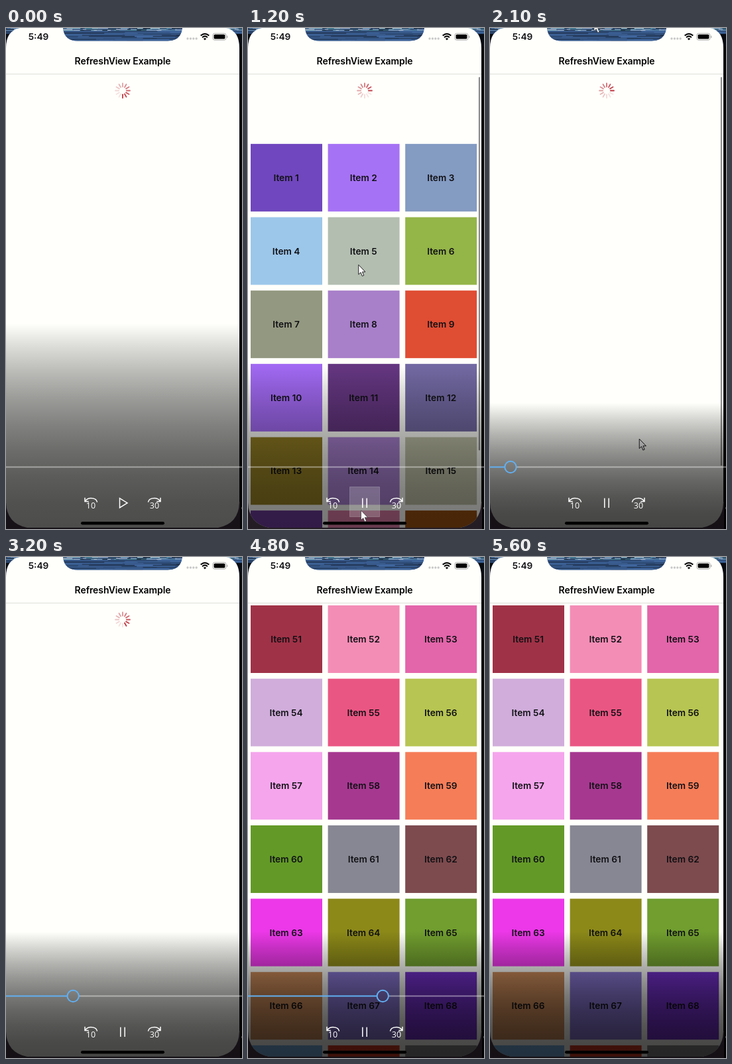
An HTML page for the animation above (5700 ms loop, 356 by 756 pixels).

```html
<!DOCTYPE html>
<html lang="en">
<head>
<meta charset="utf-8">
<title>Pull to refresh</title>
<style>
  html, body { margin: 0; width: 100%; height: 100%; overflow: hidden; background: #000; }
  svg { display: block; width: 356px; height: 756px; }
  text { font-family: Inter, Roboto, sans-serif; text-anchor: middle; }
  .label { font-size: 13.7px; font-weight: 600; fill: #101014; }
  .title { font-size: 14px; font-weight: 600; letter-spacing: -.1px; fill: #000; }
  .skip { font: 12.5px "Open Sans", "Noto Sans", sans-serif; fill: #fff; }
</style>
</head>
<body>
<svg viewBox="0 0 356 756">
  <defs>
    <clipPath id="phone"><path d="M21 0H332Q352 4 352 30V716Q351 748 320 754H32Q1 748 0 716V30Q0 4 21 0Z"/></clipPath>
    <clipPath id="page"><rect y="70" width="353" height="686"/></clipPath>
    <clipPath id="notch"><path d="M86 0Q88 19.5 108 19.5H244Q264 19.5 266 0Z"/></clipPath>
    <linearGradient id="shade" gradientUnits="userSpaceOnUse" x1="0" x2="0" y2="756"/>
    <path id="arrow" d="M0 0V14.5L3.3 11.5L5.6 17L8 16L5.7 10.7H10.2Z" stroke-linejoin="round"/>
  </defs>

  <rect width="356" height="756" fill="#080b12"/>
  <g id="wallpaper"></g>
  <rect y="715" width="353" height="41" fill="#4c3c4c"/>
  <rect x="353" y="28" width="3" height="728" fill="#050505"/>
  <rect x="355" y="723" width="1" height="3" fill="#ddd"/>

  <g clip-path="url(#phone)">
    <rect width="353" height="756" fill="#fffffb"/>
    <g id="spinner" transform="translate(176 94.5)"></g>
    <g clip-path="url(#page)"><g id="first"></g><g id="second"></g></g>
    <rect id="bar" x="347.9" y="74" width="2.2" rx="1.1" fill="#8e8e8e"/>
    <rect y="69" width="353" height="1" fill="#dededb"/>
    <text class="title" x="176" y="55.3">RefreshView Example</text>
    <text class="label" x="49" y="18">5:49</text>
    <path d="M274 16H288" stroke="#c9c9c9" stroke-width="3.4" stroke-linecap="round" stroke-dasharray="0 4.4"/>
    <g fill="none" stroke="#000" stroke-width="2">
      <path d="M293.7 11.6Q300 5.8 306.3 11.6M296.1 14.2Q300 10.6 303.9 14.2"/>
      <path d="M300 18.6L297.8 16.1Q300 14.4 302.2 16.1Z" fill="#000" stroke="none"/>
    </g>
    <rect x="312" y="8.2" width="20" height="10" rx="2.8" fill="none" stroke="#aaa"/>
    <rect x="313.6" y="9.8" width="16.8" height="6.8" rx="1.5"/>
    <rect x="333.2" y="11.5" width="1.2" height="3.5" rx=".6" fill="#aaa"/>
    <rect x="113" y="745" width="126" height="4.6" rx="2.3"/>
  </g>
  <g id="camera" clip-path="url(#notch)"></g>
  <use id="pointer" href="#arrow" fill="#fff" stroke="#222"/>

  <rect width="356" height="756" fill="url(#shade)"/>

  <g id="controls" fill="none" stroke="#fff" stroke-width="1.5">
    <path id="rest" stroke-opacity=".42" stroke-width="2"/>
    <g id="progress" stroke="#62b0f2" stroke-width="2">
      <path id="played"/><circle id="knob" cy="662.5" r="8.7"/>
    </g>
    <rect id="hover" x="153.5" y="692.5" width="45" height="45" fill="#fff" fill-opacity=".2" stroke-opacity=".2" stroke-width="1"/>
    <path id="play" d="M171.5 709.5V724L183 716.7Z"/>
    <path id="pause" d="M172.8 709.5V724M179.2 709.5V724"/>
    <path id="back" d="M137.6 715.5Q136.5 709.6 128 709.6Q122.5 709.6 119.2 714.2M119 708.8V714.6H124.8"/>
    <use href="#back" transform="translate(352 0) scale(-1 1)"/>
    <g stroke="none"><text class="skip" x="128" y="724.8">10</text><text class="skip" x="224" y="724.8">30</text></g>
  </g>
  <use id="mouse" href="#arrow" fill="#fff" stroke="#333" stroke-width=".7"/>
</svg>

<script>
const LOOP = 5700, STEP = 100;
// Playback starts, the list empties, the finger lets go, new items arrive, the spinner row closes.
const START = 400, CLEAR = 1300, RELEASE = 1550, ARRIVE = 3250, CLOSE = 3300;
const REST = 58, BOTTOM = 756;

const $ = id => document.getElementById(id);
const show = (el, on) => { el.style.display = on ? '' : 'none'; };
const mix = (a, b, k) => a + (b - a) * k;

function set(el, attrs) {
  for (const k in attrs) el.setAttribute(k, attrs[k]);
}
function add(parent, tag, attrs, text) {
  const el = document.createElementNS('http://www.w3.org/2000/svg', tag);
  set(el, attrs);
  if (text) el.textContent = text;
  return parent.appendChild(el);
}
// Smooth step from 0 to 1 between times a and b.
function ramp(t, a, b) {
  const k = Math.min(1, Math.max(0, (t - a) / (b - a)));
  return k * k * (3 - 2 * k);
}

function buildTiles(group, first, colours) {
  colours.split(' ').forEach((c, i) => {
    const x = 4 + (i % 3) * 116.6, y = 73 + Math.floor(i / 3) * 110.65;
    add(group, 'rect', { x, y, width: 108, height: 102, fill: '#' + c });
    add(group, 'text', { class: 'label', x: x + 53.6, y: y + 56 }, 'Item ' + (first + i));
  });
}
buildTiles($('first'), 1, '7047be a672f5 849bc2 9cc7ea b3beb0 94b548 939880 a87fc9 df4d33 ' +
  'a169f2 643680 7269a2 947f24 aa82d2 c0c2a8 6c3a98 dc7ba5 9a5010 c09aac e8863a e0a84a');
buildTiles($('second'), 51, 'a03247 f48db6 e365aa d0addb ea5683 b7c552 f5a5ec a63890 f57d58 ' +
  '639a27 878793 7d4b4e ec38e8 8c8919 719e2f ce8d5b 8b78d4 7430cc 7cb2e4 dc3e22 8a8a8a');

let seed = 7;
const random = () => (seed = seed * 16807 % 2147483647) / 2147483647;

// Blue static with a brighter band along the top.
function staticNoise(group, x0, x1, height) {
  add(group, 'rect', { x: x0, width: x1 - x0, height, fill: '#2a4470' });
  for (let y = 0; y < height; y += 1.5) {
    const bright = y < 4;
    for (let x = x0, width; x < x1; x += width) {
      width = bright ? 2 + random() * 14 : 15 + random() * 60;
      const fill = bright
        ? `hsl(${190 + random() * 30} 35% ${15 + random() * 65}%)`
        : `hsl(215 42% ${18 + random() * 30}%)`;
      add(group, 'rect', { x, y, width, height: 1.2, fill });
    }
  }
}
staticNoise($('wallpaper'), 0, 24, 9);
staticNoise($('wallpaper'), 330, 356, 9);
staticNoise($('camera'), 86, 268, 20);

const spokes = Array.from({ length: 12 }, (_, i) => add($('spinner'), 'line', {
  y1: -5.8, y2: -11, stroke: '#bd3540', 'stroke-width': 1.8,
  'stroke-linecap': 'round', transform: `rotate(${i * 30})`
}));

const stops = Array.from({ length: 9 }, (_, i) => add($('shade'), 'stop', { offset: i / 8 }));

function drawShade(height, strength) {
  $('shade').setAttribute('y1', BOTTOM - height);
  stops.forEach((s, i) => s.setAttribute('stop-opacity', strength * (1 - (1 - i / 8) ** 1.8)));
}

const drag = t => 503 * ramp(t, 950, 1500);

// Rubber-band pull, settling to the spinner row, then closing.
function listOffset(t) {
  const view = 690;
  const pull = view * (1 - 1 / (1 + drag(t) * .55 / view));
  if (t < CLOSE) return mix(pull, REST, ramp(t, RELEASE, RELEASE + 400));
  return REST * Math.exp((CLOSE - t) / 110);
}

function place(el, x, y, visible) {
  el.setAttribute('transform', `translate(${x} ${y})`);
  show(el, visible);
}

function drawPhone(t) {
  const dy = listOffset(t);
  for (const id of ['first', 'second']) $(id).setAttribute('transform', `translate(0 ${dy})`);
  show($('first'), t >= START && t < CLEAR);
  show($('second'), t >= ARRIVE);

  const head = t < START ? 6 : 7 + Math.floor((t - 1500) / 75);
  const shown = t < START ? 1 : ramp(t, 950, 1250) - ramp(t, CLOSE, CLOSE + 200);
  $('spinner').setAttribute('opacity', shown);
  spokes.forEach((s, i) => {
    const age = ((head - i) % 12 + 12) % 12;
    s.setAttribute('opacity', Math.max(.14, 1 - age * .09));
  });

  set($('bar'), { height: 617 - dy * .525, opacity: ramp(t, 950, 1100) - ramp(t, 2400, 2700) });

  const aside = ramp(t, 1800, 2100), leave = ramp(t, 2300, 2900);
  place($('pointer'),
    174 - drag(t) / 30 + 68 * aside + 127 * leave,
    140 + drag(t) - 23 * aside + 130 * leave,
    t >= START && t < 2900);
}

function drawPlayer(t) {
  const early = t < 1700;
  const paused = 1 - ramp(t, START, 900);
  const hidden = ramp(t, 1200, 1500) - ramp(t, 1700, 2000);
  drawShade(
    mix(191 + 55 * early + 65 * paused, 84, hidden),
    mix(.73 - .2 * early + .17 * paused, .42, hidden));

  $('controls').setAttribute('opacity', 1 - hidden - ramp(t, 5300, 5500));
  const x = 31 + (t - 2100) * .0638;
  show($('progress'), !early);
  $('knob').setAttribute('cx', x);
  $('played').setAttribute('d', `M0 662.5H${Math.max(0, x - 8.7)}`);
  $('rest').setAttribute('d', `M${early ? 0 : x + 8.7} 662.5H356`);
  show($('play'), t < START);
  show($('pause'), t >= START);
  show($('hover'), t >= 200 && early);

  const enter = ramp(t, 0, 300), exit = ramp(t, 1700, 2100);
  place($('mouse'), 200 - 29.5 * enter - 13.5 * exit, 756 - 28 * enter - 738 * exit,
    t < 1300 || !early && t < 2200);
}

const start = performance.now();
function tick() {
  const elapsed = (performance.now() - start) % LOOP;
  const t = Math.floor(elapsed / STEP) * STEP;
  drawPhone(t);
  drawPlayer(t);
  requestAnimationFrame(tick);
}
tick();
</script>
</body>
</html>
```
